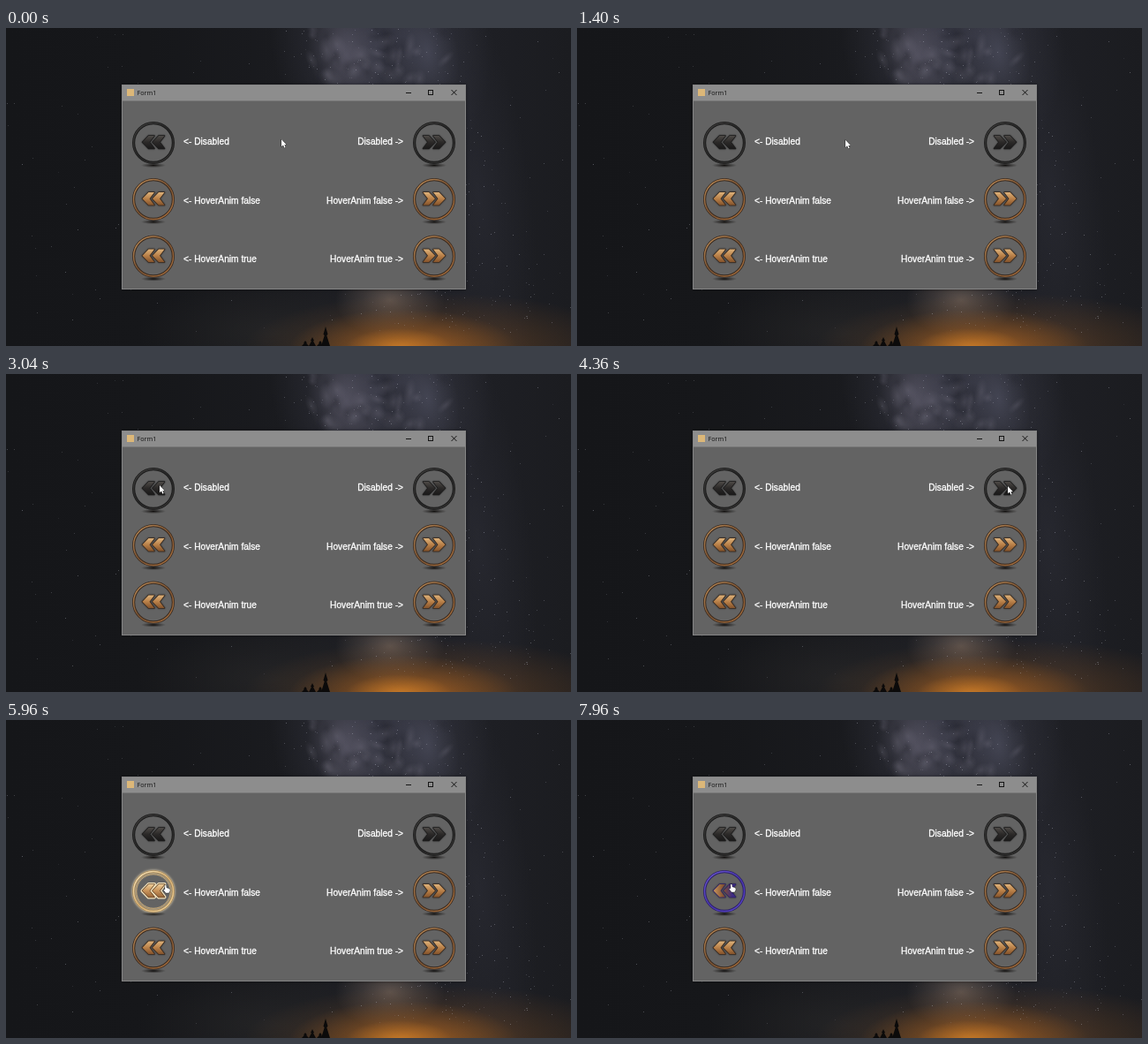
These frames come from a looping animation (640 by 360 pixels, 8000 ms). An HTML page with a canvas:

```html
<!DOCTYPE html>
<html lang="en">
<head>
<meta charset="utf-8">
<title>Button states</title>
<style>
  html, body { margin: 0; width: 100%; height: 100%; overflow: hidden; background: #15161a; }
  canvas { display: block; width: 640px; height: 360px; }
</style>
</head>
<body>
<canvas id="stage" width="640" height="360"></canvas>
<script>
const LOOP = 8000, PRESS_AT = 7680;
const stage = document.getElementById('stage');
const view = stage.getContext('2d');

// Pointer stops: time, x, y
const POINTER = [
  [0, 312, 126], [1240, 312, 126], [1960, 250, 132], [2720, 174, 126],
  [3440, 174, 126], [4240, 488, 127], [4680, 488, 127],
  [5640, 181, 187], [6300, 181, 187], [7000, 175, 186], [8000, 175, 186]
];

const LOOKS = {
  disabled: { edge: '#1b1b1b', ring: ['#3d3c3b', '#262626', '#333231'], arrow: ['#4c4845', '#2b2928', '#1b1a1a'] },
  normal: { edge: '#3a2a1e', ring: ['#b98a58', '#7c5434', '#a8703f'], arrow: ['#dcb078', '#b98048', '#85542c'] },
  hover: { edge: '#a58656', ring: ['#f6e4bb', '#d9b277', '#ecd09a'], arrow: ['#ecc994', '#c8935a', '#9a6739'], glow: '#f7e6bf' },
  pressed: { edge: '#2c2168', ring: ['#6c57d2', '#4834ae', '#5944c8'], arrow: ['#c08d58', '#80502f', '#3e2c84'], sideways: true }
};

const ROWS = [
  { y: 130, text: 'Disabled', base: 132, look: 'disabled' },
  { y: 194, text: 'HoverAnim false', base: 199, look: 'normal' },
  { y: 258.5, text: 'HoverAnim true', base: 264.5, look: 'normal' }
];

function random(seed) {
  return () => (seed = (seed * 16807) % 2147483647) / 2147483647;
}

function polygon(g, points) {
  g.beginPath();
  points.forEach(([x, y]) => g.lineTo(x, y));
  g.closePath();
}

function ramp(g, colors, x0, y0, x1, y1) {
  const fill = g.createLinearGradient(x0, y0, x1, y1);
  colors.forEach((c, i) => fill.addColorStop(i / (colors.length - 1), c));
  return fill;
}

function glow(g, x, y, rx, ry, rgb, alpha, turn = 0) {
  g.save();
  g.translate(x, y);
  g.rotate(turn);
  g.scale(rx, ry);
  const fill = g.createRadialGradient(0, 0, 0, 0, 0, 1);
  fill.addColorStop(0, `rgba(${rgb},${alpha})`);
  fill.addColorStop(0.5, `rgba(${rgb},${alpha * 0.45})`);
  fill.addColorStop(1, `rgba(${rgb},0)`);
  g.fillStyle = fill;
  g.fillRect(-1, -1, 2, 2);
  g.restore();
}

function drawSky(g) {
  const next = random(271);
  g.fillStyle = ramp(g, ['#151619', '#16171a', '#1a1b1f', '#202127', '#1b1c20'], 0, 0, 640, 0);
  g.fillRect(0, 0, 640, 360);

  // Milky way: a soft band with brighter clouds and a dark lane
  glow(g, 425, 10, 125, 170, '82,83,102', 0.55, -0.15);
  glow(g, 385, 30, 42, 65, '118,114,132', 0.5, -0.2);
  glow(g, 478, 28, 34, 60, '98,100,120', 0.4, -0.2);
  glow(g, 432, 22, 13, 55, '24,25,32', 0.45, -0.25);
  glow(g, 535, 190, 60, 230, '54,55,66', 0.35, -0.12);
  for (let i = 0; i < 40; i++) {
    const tone = next() < 0.5 ? '135,132,148' : '28,29,36';
    glow(g, 345 + next() * 155, next() * 62, 5 + next() * 12, 4 + next() * 9, tone, 0.22, next() * 3);
  }

  glow(g, 300, 345, 150, 60, '52,50,48', 0.4);
  glow(g, 435, 308, 62, 42, '142,122,108', 0.55);
  glow(g, 490, 362, 220, 62, '130,80,35', 0.6);
  glow(g, 450, 364, 130, 46, '205,115,32', 0.65);
  glow(g, 445, 362, 60, 22, '240,150,45', 0.5);

  for (let i = 0; i < 600; i++) {
    const inBand = i > 130;
    const y = next() * 345;
    const x = inBand ? 410 + y * 0.3 + (next() + next() - 1) * 125 : next() * 640;
    g.fillStyle = `rgba(200,202,216,${0.08 + next() * 0.28})`;
    g.fillRect(Math.floor(x), Math.floor(y), 1, 1);
  }

  g.fillStyle = '#0b0a0a';
  for (const [x, top, half] of [[362, 338, 5], [347, 350, 4], [339, 354, 4], [356, 354, 4]]) {
    const h = 360 - top;
    polygon(g, [[x, top], [x + half * 0.5, top + h * 0.4], [x + half * 0.25, top + h * 0.45],
      [x + half, 360], [x - half, 360], [x - half * 0.25, top + h * 0.45], [x - half * 0.5, top + h * 0.4]]);
    g.fill();
  }
}

function drawWindow(g) {
  g.save();
  g.shadowColor = 'rgba(0,0,0,.4)';
  g.shadowBlur = 4;
  g.fillStyle = '#636363';
  g.fillRect(131, 64, 390, 232);
  g.restore();
  g.fillStyle = '#8d8d8d';
  g.fillRect(131, 64, 390, 18.5);
  g.strokeStyle = '#858585';
  g.lineWidth = 1;
  g.strokeRect(131.5, 64.5, 389, 231);

  g.fillStyle = '#dcb778';
  g.fillRect(137, 69, 8, 8);
  g.fillStyle = '#111';
  g.font = '7.2px "Open Sans", sans-serif';
  g.fillText('Form1', 148.5, 76);

  g.strokeStyle = '#151515';
  g.strokeRect(478.5, 70.5, 5, 5);
  g.beginPath();
  g.moveTo(453, 73.5); g.lineTo(459, 73.5);
  g.moveTo(504.5, 70); g.lineTo(510.5, 76);
  g.moveTo(510.5, 70); g.lineTo(504.5, 76);
  g.stroke();

  g.fillStyle = g.strokeStyle = '#fff';
  g.lineWidth = 0.3;
  g.font = '10.2px "Liberation Sans", Arial, sans-serif';
  const label = (text, x, y, align) => {
    g.textAlign = align;
    g.fillText(text, x, y);
    g.strokeText(text, x, y);
  };
  for (const { text, base } of ROWS) {
    label('<- ' + text, 201, base, 'left');
    label(text + ' ->', 450, base, 'right');
  }
}

function drawButton(g, x, y, name, mirrored) {
  const look = LOOKS[name];
  const circle = (r, width, color) => {
    g.beginPath();
    g.arc(0, 0, r, 0, Math.PI * 2);
    g.lineWidth = width;
    g.strokeStyle = color;
    g.stroke();
  };
  g.save();
  g.translate(x, y);
  glow(g, 0, 25.5, 14, 2.6, '16,14,13', 1);

  g.save();
  if (look.glow) {
    g.shadowColor = look.glow;
    g.shadowBlur = 3;
  }
  circle(22.4, 3.2, look.edge);
  g.restore();
  circle(22.5, 1.4, ramp(g, look.ring, -18, -20, 18, 20));
  if (look.glow) circle(19.3, 1, '#c9a873');

  g.translate(0, -0.7);
  if (mirrored) g.scale(-1, 1);
  g.lineJoin = 'round';
  for (const dx of [0, 11.5]) {
    polygon(g, [[-12.5 + dx, 0], [-5.5 + dx, -7.2], [1 + dx, -7.2], [-4.5 + dx, 0], [1 + dx, 7.2], [-5.5 + dx, 7.2]]);
    if (look.glow) {
      g.lineWidth = 4;
      g.strokeStyle = look.glow;
      g.stroke();
    }
    g.save();
    g.shadowColor = 'rgba(0,0,0,.5)';
    g.shadowBlur = look.glow ? 0 : 2;
    g.lineWidth = 1.6;
    g.strokeStyle = look.glow ? '#65482c' : look.edge;
    g.stroke();
    g.restore();
    g.fillStyle = look.sideways ? ramp(g, look.arrow, -11, 0, 9, 0) : ramp(g, look.arrow, 0, -7, 0, 7);
    g.fill();
  }
  g.restore();
}

function drawPointer(g, x, y, hand) {
  g.save();
  g.translate(x, y);
  g.scale(0.88, 0.88);
  g.lineJoin = 'round';
  g.lineWidth = 1;
  g.strokeStyle = '#151515';
  g.fillStyle = '#fff';
  polygon(g, hand
    ? [[-1, 0], [0.5, 0], [1, 3.5], [5, 4.5], [5.5, 7], [4, 10], [0, 10], [-3, 6], [-2, 5], [-1, 6]]
    : [[0, 0], [0, 9.5], [2.2, 7.5], [3.8, 11], [5.3, 10.3], [3.8, 7], [6.7, 7]]);
  g.stroke();
  g.fill();
  g.restore();
}

function pointerAt(t) {
  const i = POINTER.findIndex(stop => stop[0] > t);
  const [t0, x0, y0] = POINTER[i - 1], [t1, x1, y1] = POINTER[i];
  const p = (t - t0) / (t1 - t0), eased = p * p * (3 - 2 * p);
  return [x0 + (x1 - x0) * eased, y0 + (y1 - y0) * eased];
}

const backdrop = document.createElement('canvas');
backdrop.width = 640;
backdrop.height = 360;
const back = backdrop.getContext('2d');
drawSky(back);
drawWindow(back);

function render() {
  const t = performance.now() % LOOP;
  const [px, py] = pointerAt(t);
  let hand = false;
  view.drawImage(backdrop, 0, 0);
  for (const { y, look } of ROWS) {
    for (const x of [167, 485]) {
      const over = look === 'normal' && Math.hypot(px - x, py - y) < 24;
      const state = over ? (t >= PRESS_AT ? 'pressed' : 'hover') : look;
      hand = hand || over;
      drawButton(view, x, y, state, x > 320);
    }
  }
  drawPointer(view, px, py, hand);
  requestAnimationFrame(render);
}
render();
</script>
</body>
</html>
```
